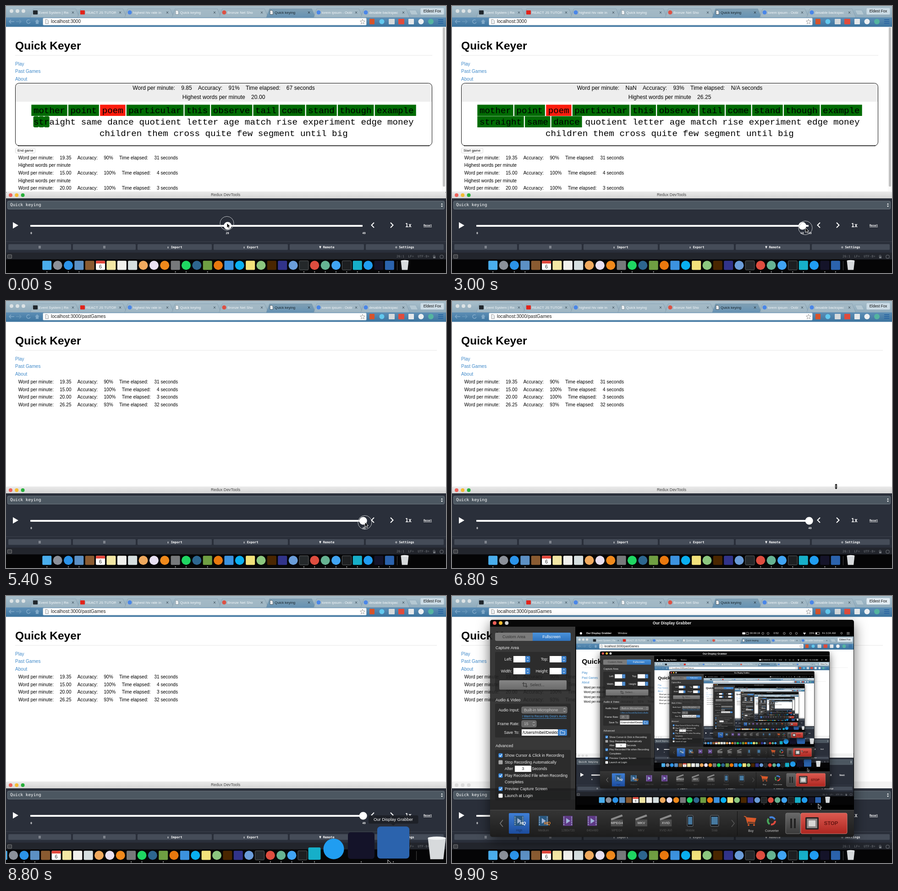
An HTML page with a canvas for the animation above (10 s loop, 960 px wide and 583 px high).

```html
<!DOCTYPE html>
<html lang="en">
<head>
<meta charset="utf-8">
<title>Quick Keyer</title>
<style>
html,body{margin:0;width:100%;height:100%;overflow:hidden;background:#000}
canvas{display:block;width:960px;height:583px}
</style>
</head>
<body>
<canvas id="stage" width="960" height="583"></canvas>
<script>
const c = document.getElementById('stage').getContext('2d');
const SANS = '"Liberation Sans",Arial,sans-serif';
const CODE = '"DejaVu Sans Mono",monospace';
const TYPE = '"Liberation Mono",monospace';
const LOOP = 10000, OPEN = 9200, SHRINK = 0.631;
const GREEN = '#006b03', SMALL = 10.1, LARGE = 12.1;

// ---- helpers
function box(x, y, w, h, fill, r = 0, stroke) {
  c.beginPath();
  if (r) c.roundRect(x, y, w, h, r); else c.rect(x, y, w, h);
  if (fill) { c.fillStyle = fill; c.fill(); }
  if (stroke) { c.strokeStyle = stroke; c.lineWidth = 1; c.stroke(); }
}
function dot(x, y, r, fill) {
  c.beginPath(); c.arc(x, y, r, 0, 7); c.fillStyle = fill; c.fill();
}
function ring(x, y, r, color, w = 1) {
  c.beginPath(); c.arc(x, y, r, 0, 7); c.strokeStyle = color; c.lineWidth = w; c.stroke();
}
function path(pts, fill, stroke, w = 1) {
  c.beginPath();
  for (let i = 0; i < pts.length; i += 2) c.lineTo(pts[i], pts[i + 1]);
  if (fill) { c.closePath(); c.fillStyle = fill; c.fill(); }
  if (stroke) { c.strokeStyle = stroke; c.lineWidth = w; c.stroke(); }
}
function text(s, x, y, size, fill = '#000', align = 'left', font = SANS, weight = '') {
  c.font = `${weight} ${size}px ${font}`;
  c.textAlign = align; c.textBaseline = 'middle'; c.fillStyle = fill;
  c.fillText(s, x, y);
}
function shade(y0, y1, ...stops) {
  const g = c.createLinearGradient(0, y0, 0, y1);
  stops.forEach((s, i) => g.addColorStop(i / (stops.length - 1), s));
  return g;
}
// Values at time t on a list of [time, ...values]
function along(keys, t) {
  let i = 0;
  while (i < keys.length - 2 && t >= keys[i + 1][0]) i++;
  const a = keys[i], b = keys[i + 1];
  const p = Math.min(1, Math.max(0, (t - a[0]) / (b[0] - a[0])));
  return a.slice(1).map((v, n) => v + (b[n + 1] - v) * p);
}
// Pieces of text in a row with a fixed gap
function row(parts, x, y, size, centered) {
  const gap = 13.33;
  c.font = ` ${size}px ${SANS}`;
  const w = parts.map(p => c.measureText(p).width);
  if (centered) x -= (w.reduce((a, b) => a + b) + gap * (w.length - 1)) / 2;
  parts.forEach((p, i) => { text(p, x, y, size); x += w[i] + gap; });
}
const stats = (wpm, acc, sec) =>
  ['Word per minute:', wpm, 'Accuracy:', acc + '%', 'Time elapsed:', sec + ' seconds'];

// ---- motion
const STEP = [[0, 29], [1400, 41], [2300, 48], [4900, 48], [5100, 49]];
const POINTER = [[0, 482, 474], [1400, 666, 478], [2300, 770, 481], [3000, 771, 484], [3500, 771, 484],
  [4300, 754, 487], [4700, 754, 487], [5200, 783, 483], [5700, 783, 483], [6500, 838, 405],
  [7400, 838, 405], [8200, 833, 576], [9300, 833, 576], [9800, 799, 454]];
const SWELL = [[8050, 0], [8300, 1], [9580, 1], [9750, 0]];

// ---- browser
const TABS = [['Event System | Rea', '#20262c', 0], ['REACT JS TUTOR', '#e2231a', 0],
  ['highest hiv rate in', '#4a86e8', 1], ['Quick keying', '', 2], ['Bronze Net Sho', '#dd5144', 1],
  ['Quick keying', '', 2], ['lorem ipsum - Oobl', '#4a86e8', 1], ['desable backspac', '#4a86e8', 1]];

function sheet(x, y, color) {
  path([x - 3, y - 4.5, x + 1, y - 4.5, x + 3.5, y - 2, x + 3.5, y + 4.5, x - 3, y + 4.5, x - 3, y - 4.5], '#eef1f3', color, 0.8);
}
function browser(past, front) {
  box(0, 0, 960, 25, shade(0, 25, '#a9bfcb', '#8fabbc'));
  [12, 25, 38].forEach(x => dot(x, 11, 4, '#dce2e4'));
  TABS.forEach(([name, color, kind], i) => {
    const x = 53 + 103 * i, on = i === 5;
    path([x, 25, x + 7, 6, x + 99, 6, x + 107, 25], on ? shade(6, 25, '#7f9fb3', '#6692b3') : 'rgba(164,186,198,.75)',
      'rgba(70,100,122,.35)', 0.7);
    if (kind === 2) sheet(x + 11, 14, on ? '#34424c' : '#778892');
    else if (kind) dot(x + 11, 14, 4.5, color);
    else box(x + 6, 9.5, 10, 9, color, 1);
    c.save();
    c.beginPath(); c.rect(x, 4, 84, 20); c.clip();
    text(name, x + 18, 14.5, 7.9, on ? '#17232b' : '#f3f7f9');
    c.restore();
    const k = on ? '#26343e' : '#40525e';
    path([x + 91, 12, x + 95, 16.5], 0, k); path([x + 95, 12, x + 91, 16.5], 0, k);
  });
  path([879, 9, 894, 9, 899, 19, 884, 19], '#b4c8d3', '#84a0b2', 0.6);
  box(904, 4, 52, 15, front ? '#e3edf4' : '#ccdce6', 2, '#9eb4c2');
  text('Eldest Fox', 930, 12, 8.2, '#111', 'center');

  box(0, 25, 960, 20.5, shade(25, 45, '#5d8eb5', '#3c749f'));
  const faint = '#80a9c8';
  path([11, 30, 7, 34, 11, 38], 0, faint, 1.5); path([7, 34, 18, 34], 0, faint, 1.5);
  path([29, 30, 33, 34, 29, 38], 0, '#6997ba', 1.5); path([22, 34, 33, 34], 0, '#6997ba', 1.5);
  c.beginPath(); c.arc(49, 34, 4, 0.3, 5.4); c.strokeStyle = faint; c.lineWidth = 1.5; c.stroke();
  path([63, 34, 68, 29, 73, 34, 71, 34, 71, 39, 65, 39, 65, 34], faint);
  box(80.5, 26, 706, 16, '#fff', 2, '#8cabc0');
  sheet(89, 34, '#888');
  text('localhost:3000' + (past ? '/pastGames' : ''), 98, 34.5, SMALL, '#222');
  const star = [];
  for (let i = 0; i <= 10; i++) {
    const a = i * Math.PI / 5 - Math.PI / 2, r = i % 2 ? 2.5 : 5.6;
    star.push(778 + r * Math.cos(a), 34.5 + r * Math.sin(a));
  }
  path(star, 0, '#888', 0.8);
  box(793, 28, 11, 12, '#d6532b', 1);
  dot(820, 34, 5.5, '#62c8ee');
  box(835, 28, 13, 12, '#d5d9dc', 1);
  box(856, 28, 13, 12, '#e04b3c', 1);
  box(878, 28, 12, 12, '#e6e9eb', 1);
  dot(905.5, 34, 6, '#edf0f2');
  dot(927, 34, 6, '#54b4a0');
  [30, 34, 38].forEach(y => box(943, y - 1, 11, 2, '#2d68a3'));
}

// ---- page
const LINES = ['mother point poem particular this observe tail come stand though example',
  'straight same dance quotient letter age match rise experiment edge money',
  'children them cross quite few segment until big'];
const GAMES = [['19.35', 90, 31], ['15.00', 100, 4], ['20.00', 100, 3], ['26.25', 93, 32]];

function typing(step, t) {
  // The game ends after the space that follows "dance"
  const typed = Math.min(step, 46) - 26, over = step > 46, cw = 11.53;
  let done = 0;
  box(20.5, 168.5, 909, 136.5, '#fff', 8);
  box(20.5, 168.5, 909, 40.5, '#eee', [8, 8, 0, 0]);
  box(20.5, 168.5, 909, 136.5, 0, 8, '#111');
  path([26, 305.3, 924, 305.3], 0, '#111', 1.3);
  LINES.forEach((line, n) => {
    const left = 475 - line.length * cw / 2, y = 215.5 + 25 * n;
    let at = 0;
    for (const word of line.split(' ')) {
      const x = left + at * cw, len = word.length;
      if (n === 0 || n === 1 && typed > at + len) {
        box(x - 4.6, y, len * cw + 9.2, 24.5, word === 'poem' ? '#fc1c0d' : GREEN);
        done++;
      } else if (n === 1) {
        for (let i = 0; i < Math.min(len, typed - at); i++) box(x + i * cw - 0.3, y, cw + 0.6, 24.5, GREEN, 3.5);
      }
      at += len + 1;
    }
    c.font = `19.22px ${TYPE}`; c.textAlign = 'left'; c.textBaseline = 'alphabetic'; c.fillStyle = '#000';
    c.fillText(line, left, y + 18.8);
  });
  const sec = 67 + Math.floor(t / 1000 + 0.7);
  const acc = Math.round(100 * (done - 1) / done);
  row(over ? stats('NaN', 93, 'N/A') : stats((done / sec * 60).toFixed(2), acc, sec), 475, 179.5, LARGE, true);
  row(['Highest words per minute', over ? '26.25' : '20.00'], 475, 199.5, LARGE, true);
  box(20.5, 310.5, over ? 47 : 43, 10.5, '#fff', 2, '#d8d8d8');
  text(over ? 'Start game' : 'End game', 25, 316, 7.6);
  GAMES.slice(0, 3).forEach((g, i) => {
    row(stats(...g), 26.7, 332 + 33.3 * i, SMALL);
    if (i < 2) text('Highest words per minute', 26.7, 348.7 + 33.3 * i, SMALL);
  });
  box(951, 45, 9, 360, '#fafafa');
  box(953, 46.5, 5, 348, '#c2c2c2', 2.5);
}
function page(step, t, past) {
  box(0, 45, 960, 361, '#fff');
  text('Quick Keyer', 20, 88, 24.6, '#000', 'left', SANS, 'bold');
  box(20, 107.3, past ? 920 : 910, 1, '#e6e6e6');
  ['Play', 'Past Games', 'About'].forEach((s, i) => text(s, 20, 127 + 16.7 * i, SMALL, '#428bca'));
  if (past) GAMES.forEach((g, i) => row(stats(...g), 26.7, 177.3 + 16.7 * i, SMALL));
  else typing(step, t);
}

// ---- slider panel
function panel(step, inactive) {
  const mono = (s, x, y, size, align = 'left', w = 'bold') => text(s, x, y, size, '#fff', align, CODE, w);
  box(0, 405, 960, 15, inactive ? '#f3f3f3' : shade(405, 420, '#ebebeb', '#d4d4d4'), [4, 4, 0, 0]);
  (inactive ? ['#dcdcdc', '#dcdcdc', '#dcdcdc'] : ['#ee6058', '#f4bc32', '#27b03b'])
    .forEach((k, i) => dot(10 + 13.3 * i, 413, 4, k));
  text('Redux DevTools', 479, 413, 8.8, '#444', 'center');
  box(0, 420, 960, 120, '#2a2f3a');
  box(3.5, 426, 953, 17.5, '#4c5761', 2, '#6e7881');
  mono('Quick keying', 9, 435, 9.35, 'left', '');
  path([949, 433.5, 951, 430.5, 953, 433.5], '#fff');
  path([949, 436, 951, 439, 953, 436], '#fff');
  path([15, 472, 27, 479, 15, 486], '#fff');
  box(53, 478, 725, 4, '#fff', 1);
  const x = 55 + 14.78 * step;
  mono('0', 55, 496.5, 6, 'center');
  mono('49', 781, 496.5, 6, 'center');
  if (step < 49) mono(step, x - 0.5, 496.5, 6, 'center');
  dot(x, 480, 8.5, '#fff');
  path([803, 473, 797.5, 478.5, 803, 484], 0, '#fff', 2);
  path([839, 473, 844.5, 478.5, 839, 484], 0, '#fff', 2);
  mono('1x', 871, 480, 11.5);
  mono('Reset', 911, 479.5, 6);
  box(911, 482, 18, 0.8, '#fff');
  box(0, 514, 960, 1, '#3b414c');
  [[5, 137], [146, 137], [287, 162, '↥ Import'], [453, 162, '↥ Export'], [619, 162, 'Ψ Remote'], [785, 170, '⚙ Settings']]
    .forEach(([bx, w, s]) => {
      box(bx, 520, w, 12.5, '#454c58', 1.5);
      const m = bx + w / 2;
      if (s) mono(s, m, 527, 6.9, 'center');
      else [524, 526, 528].forEach(y => box(m - 2.5, y, 5, 1, '#b4b8be'));
    });
  box(0, 538.5, 960, 15, '#22252c');
  box(3.5, 543, 9, 8, '#3a3d42', 1, '#777');
  text('26:1  LF÷  UTF-8÷', 852, 547.5, 7, '#70747a', 'left', CODE);
  box(932, 547, 5, 4, '#70747a'); ring(934, 546, 2, '#70747a');
  box(947, 544, 7, 7, 0, 2, '#70747a');
}

// ---- dock: colour and shape (o round, s square) per icon
const ICONS = ('4aaeeds 8b9099o 2b93e9o 5c90c4s 8a5b31s fffs f3e7a4s f1f1eds d6dfe0s efa95eo e8e0f2o f0891bo ' +
  '77797bs 1fd662o 2d668fo 6f9f42s e9780eo 3c92dfs 09aff0o f2e27bs 8cc77fo 4a2600s 31338as 6b9dd9o ' +
  '24282as de4d3fo 66b392o 40a4f3o 1d1f21s 16afc9s 209df1o 141329s 2b63ads trash').split(' ');
const BIG = { 29: [673, 27], 30: [715, 45], 31: [775, 58], 32: [845, 70], 33: [940, 46] };
const RUNNING = [0, 2, 3, 12, 13, 15, 24, 25, 26, 27, 28, 29, 31, 32];

function dock(m) {
  box(0, 553.5, 960, 30, '#050506');
  ICONS.forEach((icon, i) => {
    const home = i === 33 ? 870 : 89.3 + 23.36 * i;
    const [bx, bs] = BIG[i] || [home - 96.5, 20];
    const x = home + (bx - home) * m, s = 20 + (bs - 20) * m;
    const y = 577.5 - 0.06 * s - s / 2, h = s / 2;
    if (icon === 'trash') {
      path([x - h * .85, y - h, x + h * .85, y - h, x + h * .62, y + h, x - h * .62, y + h], '#d7dadc');
      c.beginPath(); c.ellipse(x, y - h, h * .85, h * .15, 0, 0, 7); c.fillStyle = '#f2f4f5'; c.fill();
      return;
    }
    const color = '#' + icon.slice(0, -1);
    if (icon.endsWith('o')) dot(x, y, h, color);
    else box(x - h, y - h, s, s, color, s * 0.1, i === 28 || i === 24 ? '#5c6062' : 0);
    if (i === 5) {
      box(x - h, y - h, s, 6, '#e2463b', [2, 2, 0, 0]);
      text('6', x, y + 3.5, 11, '#333', 'center');
    }
    if (RUNNING.includes(i)) dot(x, 580.5, 1, '#d8d8d8');
  });
  box(853 + 42 * m, 557, 0.8, 20, '#555');
  if (m === 1) {
    box(791, 479, 108.5, 18, 'rgba(29,32,38,.95)', 3);
    path([840, 497, 850, 497, 845, 501], '#1d2026');
    text('Our Display Grabber', 845, 488.5, 9.4, '#fff', 'center');
  }
}

// ---- recorder window
function stepper(x, y) {
  box(x, y, 10.5, 14, '#3a7fca', 2);
  path([x + 3, y + 5.5, x + 5.2, y + 3, x + 7.4, y + 5.5], 0, '#fff');
  path([x + 3, y + 8.5, x + 5.2, y + 11, x + 7.4, y + 8.5], 0, '#fff');
}
function pick(s, x, y, w) {
  box(x, y, w, 14, '#676767', 2.5, '#7c7c7c');
  text(s, x + 5, y + 7.5, 8.7, '#c9c9c9');
  path([x + w - 8, y + 5.5, x + w - 5.5, y + 3, x + w - 3, y + 5.5], 0, '#ddd');
  path([x + w - 8, y + 8.5, x + w - 5.5, y + 11, x + w - 3, y + 8.5], 0, '#ddd');
}
function settings() {
  const label = (s, x, y, align) => text(s, x, y, 8.6, '#eee', align);
  box(94, 80, 165, 18, '#7b7b7b', 3);
  box(176, 80, 83, 18, shade(80, 98, '#4a93dc', '#2f73bd'), [0, 3, 3, 0]);
  text('Custom Area', 135, 89.5, 8.6, '#333', 'center');
  text('Fullscreen', 217, 89.5, 8.6, '#fff', 'center');
  [[122, 86], [235, 74], [336, 110]].forEach(([y, h]) => box(94, y, 165, h, 'rgba(20,20,20,.35)', 3));
  label('Capture Area', 95, 113.5);
  label('Audio & Video', 95, 227.5);
  label('Advanced', 95, 327.5);
  [['Left:', 131, 131], ['Top:', 210, 131], ['Width:', 131, 157], ['Height:', 210, 157]].forEach(([s, x, y]) => {
    label(s, x, y + 8, 'right');
    box(x + 3, y, 26, 14, '#fff');
    stepper(x + 29, y);
  });
  box(103, 184, 147, 20.5, shade(184, 205, '#858585', '#6a6a6a'), 2);
  path([156, 188, 156, 197, 165, 197], 0, '#333', 1.2);
  path([153, 191, 162, 191, 162, 200], 0, '#333', 1.2);
  text('Select...', 170, 194.5, 8.8, '#333');
  label('Audio Input:', 147, 249.5, 'right');
  pick('Built-in Microphone', 152, 242, 99);
  text("I Want to Record My Desk's Audio", 153, 263.5, 6.4, '#4f9fe8');
  box(153, 267, 97, 0.7, '#4f9fe8');
  label('Frame Rate:', 147, 279.5, 'right');
  pick('15', 152, 272, 32);
  label('Save To:', 147, 298.5, 'right');
  box(152, 291, 79, 14, '#fff');
  c.save();
  c.beginPath(); c.rect(152, 291, 79, 14); c.clip();
  text('/Users/mibel/Deskto', 154, 298.5, 8.8);
  c.restore();
  box(231, 291, 20, 14, '#3a7fca', 2);
  path([236, 302, 236, 294, 240, 294, 241, 296, 246, 296, 246, 302, 236, 302], 0, '#fff', 0.9);
  [['Show Cursor & Click in Recording', 348, 1], ['Stop Recording Automatically', 363, 2],
    ['Play Recorded File when Recording', 392, 1], ['Preview Capture Screen', 421, 1], ['Launch at Login', 436, 0]]
    .forEach(([s, y, kind]) => {
      box(101.5, y - 4.5, 9, 9, ['#fff', '#3b8be0', '#a5a5a5'][kind], 1.5);
      if (kind === 1) path([103.5, y, 105.5, y + 2.5, 108.8, y - 2.5], 0, '#fff', 1.3);
      label(s, 115, y + 0.5);
    });
  label('After', 115, 378);
  box(137, 370.5, 36, 13.5, '#fff');
  text('3', 155, 378, 8.6, '#222', 'center');
  label('Seconds', 174, 378);
  label('Completes', 115, 406.5);
}
function formats() {
  box(83, 467, 794, 59, shade(467, 526, '#353535', '#1c1c1c'), [0, 0, 5, 5]);
  box(83, 467, 794, 1, '#4a4a4a');
  path([111, 489, 105, 496.5, 111, 504], 0, '#777', 1.6);
  path([610, 489, 616, 496.5, 610, 504], 0, '#555', 1.6);
  box(124, 474, 45, 45, shade(474, 519, '#3f7fd6', '#1c4c9d'), 2);
  ['High', 'Medium', '1280x720', '640x480', 'MPEG4', 'MKV', 'XVID AVI', 'Mobile', 'Slab'].forEach((s, i) => {
    const x = 146.5 + 53.3 * i;
    if (i < 4) {
      box(x - 11, 480, 21, 22, i < 2 ? '#29577f' : '#5f3a86', 1);
      for (let y = 482; y < 501; y += 4) [-10, 7].forEach(d => box(x + d, y, 2, 2, '#aebfd2'));
      path([x - 4, 485, x + 5, 491, x - 4, 497], '#9fb4d6');
      if (i < 2) text(i ? 'MQ' : 'HQ', x + 8, 497, 9, i ? '#ef8a33' : '#fff', 'center', SANS, 'bold italic');
    } else if (i < 7) {
      box(x - 13, 488, 26, 15, '#4d4d4d');
      path([x - 13, 486, x + 11, 477, x + 13, 481, x - 12, 490], '#8a8a8a');
      text(s.split(' ')[0], x, 496, 7.5, '#b9b9b9', 'center', SANS, 'bold');
    } else {
      const w = i === 7 ? 13 : 18;
      box(x - w / 2, 479, w, 24, '#15181c', 2, '#757a80');
      box(x - w / 2 + 2, 482, w - 4, 17, '#47799f');
    }
    text(s, x, 512.5, 6.6, i ? '#555' : '#17305a', 'center');
  });
  box(622, 470, 1, 53, '#111');
  path([637, 481, 641, 482, 645, 496, 661, 496], 0, '#e0632c', 1.6);
  path([641, 483, 664, 485, 661, 494, 644, 493], '#d9592a');
  dot(647, 500, 2, '#d9592a'); dot(659, 500, 2, '#d9592a');
  ['#df4a3e', '#48a95b', '#4383dc'].forEach((k, i) => {
    c.beginPath(); c.arc(697, 491, 8, i * 2.09, i * 2.09 + 1.7);
    c.strokeStyle = k; c.lineWidth = 4; c.stroke();
  });
  text('Buy', 652, 513, 6.8, '#ccc', 'center');
  text('Converter', 698, 513, 6.8, '#ccc', 'center');
  box(728, 474, 32, 45, shade(474, 519, '#696969', '#3a3a3a'), 3, '#777');
  box(738, 486, 4, 21, '#222'); box(746, 486, 4, 21, '#222');
  box(761, 474, 101, 45, shade(474, 519, '#dc5a50', '#ad2620'), 3, '#d57770');
  box(771, 483, 29, 27, '#2a2222', 2);
  box(774, 486, 23, 21, '#8d8887', 1);
  box(778, 490, 15, 13, '#d8d6d4', 1);
  text('STOP', 827, 497, 11.2, '#641411', 'center', SANS, 'bold');
}
function menuBar() {
  const say = (s, x, w = '') => text(s, x, -10.5, 9, '#fff', 'left', SANS, w);
  box(0, -19, 960, 19, '#000');
  dot(17, -10.5, 4, '#fff');
  say('Our Display Grabber', 35, 'bold');
  say('Window', 145);
  box(575, -14, 10, 7, '#fff'); box(588, -14, 9, 7, 0, 1, '#fff');
  say('00:00:19', 601);
  [646, 664, 720, 742, 762].forEach(x => ring(x, -10.5, 3.5, '#fff'));
  say('0:52', 683);
  path([785, -13, 795, -13, 790, -6], '#fff');
  say('23%', 806);
  box(828, -14, 14, 7, 0, 1, '#fff'); box(829, -13, 4, 5, '#fff');
  say('Fri 3:34 AM', 851);
  ring(918, -11, 3, '#fff');
  [-14, -11, -8].forEach(y => box(936, y, 10, 1, '#fff'));
}
function recorder(t, depth) {
  c.save();
  c.beginPath(); c.rect(0, 0, 960, 583); c.roundRect(83, 52, 794, 474, 5); c.clip('evenodd');
  c.shadowColor = 'rgba(0,0,0,.6)';
  c.shadowBlur = 28 * SHRINK ** depth; c.shadowOffsetY = 9 * SHRINK ** depth;
  box(83, 52, 794, 474, '#000', 5);
  c.restore();
  box(83, 52, 794, 15, '#080808', [5, 5, 0, 0]);
  ['#ee6058', '#f4bc32', '#d3d3d3'].forEach((k, i) => dot(93 + 13.2 * i, 59, 4, k));
  text('Our Display Grabber', 480, 60, 8.6, '#f4f4f4', 'center', SANS, 'bold');
  box(83, 67, 186, 400, 'rgba(37,37,37,.91)');
  settings();
  box(269, 67, 608, 400, '#000');
  c.save();
  c.beginPath(); c.rect(269, 76, 608, 391); c.clip();
  c.translate(270.6, 88.2); c.scale(SHRINK, SHRINK);
  menuBar();
  c.beginPath(); c.rect(0, 0, 960, 583); c.clip();
  if (depth < 7) screen(t - 110, depth + 1);
  c.restore();
  formats();
}

// ---- pointer
function pointer(t) {
  const [x, y] = along(POINTER, t);
  if (t < 5600) { ring(x, y + 0.5, 15, 'rgba(225,228,232,.85)'); ring(x, y + 0.5, 13.6, 'rgba(0,0,0,.35)', 0.7); }
  if (t > 5700 && t < 8000 && Math.abs(y - 405) < 6) {
    path([x, y - 5, x, y + 5], 0, '#000', 1.4);
    path([x - 3, y - 2.5, x, y - 6, x + 3, y - 2.5], '#000');
    path([x - 3, y + 2.5, x, y + 6, x + 3, y + 2.5], '#000');
    path([x - 3, y, x + 3, y], 0, '#000');
    return;
  }
  const arrow = [0, 0, 0, 10.5, 2.4, 8.3, 4.2, 12, 6, 11.2, 4.3, 7.6, 7.5, 7.5, 0, 0];
  path(arrow.map((v, i) => v + (i % 2 ? y : x)), '#000', '#fff', 0.9);
}

// The preview inside the recorder shows the same screen a moment earlier
function screen(t, depth) {
  const step = Math.round(along(STEP, t)[0]), past = step === 49, open = t >= OPEN;
  page(step, t, past);
  browser(past, open);
  panel(step, open);
  dock(along(SWELL, t)[0]);
  if (open) recorder(t, depth);
  pointer(t);
}
const start = performance.now();
function tick(now) {
  const t = Math.max(0, now - start) % LOOP;
  screen(Math.floor(t / 100) * 100, 0);
  requestAnimationFrame(tick);
}
requestAnimationFrame(tick);
</script>
</body>
</html>
```
